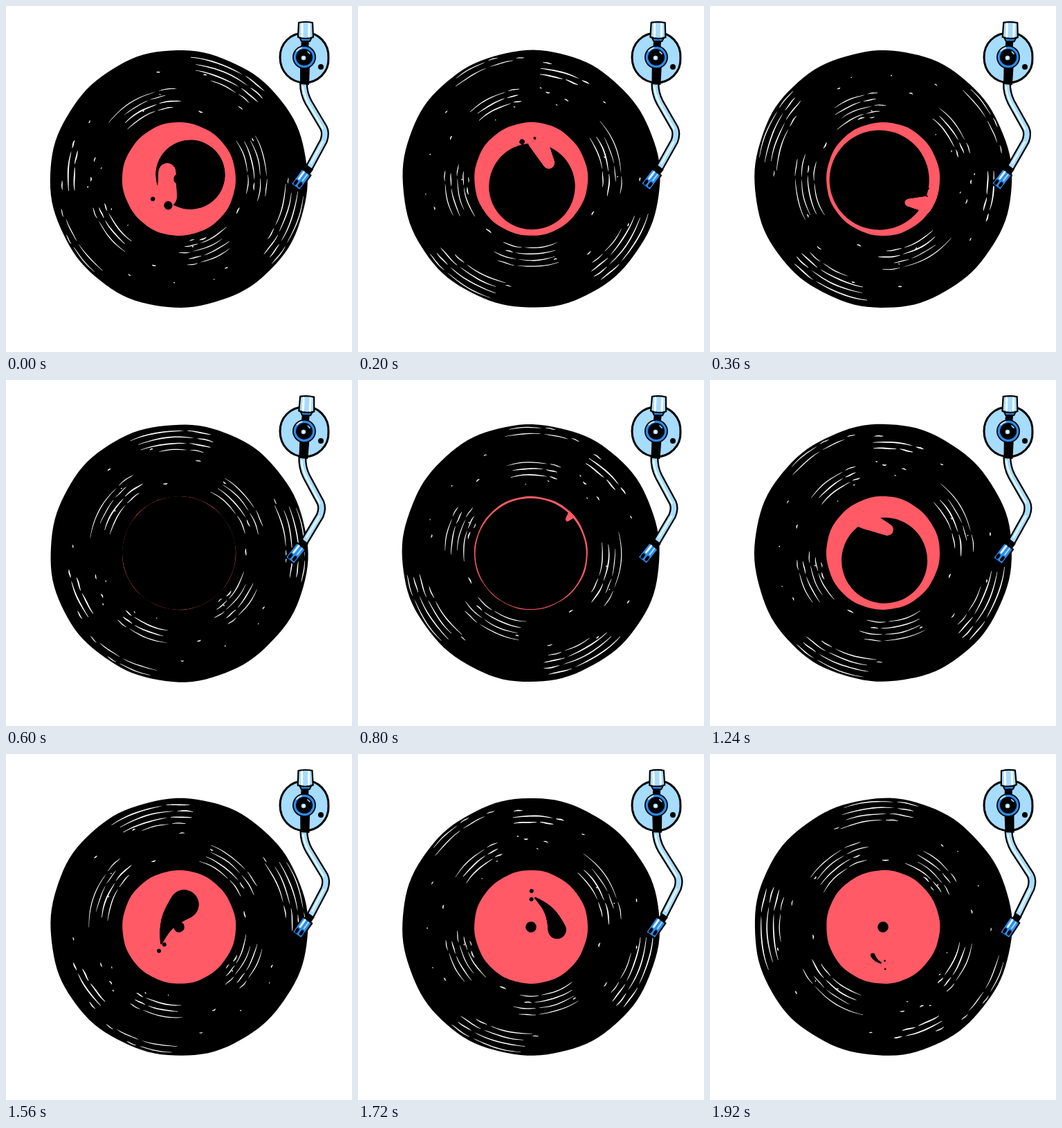
These frames come from a looping animation (500x500 px, 1960 ms). An HTML page with a canvas:

```html
<!DOCTYPE html>
<html lang="en">
<head>
<meta charset="utf-8">
<title>Turntable</title>
<style>
  html, body { margin: 0; width: 100%; height: 100%; overflow: hidden; background: #fff; }
  canvas { display: block; width: 500px; height: 500px; }
</style>
</head>
<body>
<canvas id="stage" width="500" height="500"></canvas>
<script>
const ctx = document.getElementById('stage').getContext('2d');
const STEP = 40, STEPS = 49, C = 250, LABEL = 82, FULL = 15, RAD = Math.PI / 180;
const INK = '#000', PINK = '#ff5a66', SKY = '#a6dcfd', BLUE = '#2a8cf0', PALE = '#e8f7ff';

// Angles in degrees; side and hook are places of the pool and its notch on the record
const keys = [
  { at: 0, turn: 297, arm: 0, size: 50, side: 42, hook: -85 },
  { at: 9, turn: 479, arm: 1.5, size: 72, side: 46, hook: -76 },
  { at: FULL, turn: 628, arm: 2.5, size: 82.1, side: 46, hook: -95 },
  { at: 24, turn: 910, arm: 2.1, size: 78.5, side: 46, hook: -117 },
  { at: 31, turn: 1108, arm: .8, size: 62, side: 51, hook: -107 },
  { at: 39, turn: 1338, arm: -.6, size: 21, side: 25, hook: -122 },
  { at: 48, turn: 1621, arm: -2.3, size: 3, side: -71, hook: -88 }
];

function poseAt(n) {
  let i = 0;
  while (i < keys.length - 2 && n >= keys[i + 1].at) i++;
  const a = keys[i], b = keys[i + 1], u = (n - a.at) / (b.at - a.at), pose = {};
  for (const name in a) pose[name] = a[name] + (b[name] - a[name]) * u;
  return pose;
}

const polar = (deg, r) => [r * Math.cos(deg * RAD), r * Math.sin(deg * RAD)];

let seed = 7;
const rand = () => (seed = (seed * 16807) % 2147483647) / 2147483647;

// Groove bundles: middle angle, radius, span, count
const bundles = [
  [190, 163, 42, 4], [275, 168, 36, 4], [244, 113, 50, 4], [322, 111, 42, 4],
  [38, 122, 36, 3], [139, 117, 50, 4], [77, 156, 28, 2], [40, 177, 34, 2]
];
const REST = 910;
const strokes = [];
for (const [mid, radius, span, count] of bundles) {
  for (let i = 0; i < count; i++) {
    const r = radius + (i - (count - 1) / 2) * 9, len = span * (.6 + rand() * .4);
    const a = mid - len / 2 + (rand() - .5) * 8, cut = a + len * (.6 + rand() * .25);
    const w = .9 + rand() * .8;
    strokes.push([r, a, cut - 1, w], [r + .4, cut + .5, a + len, w]);
  }
}
for (let i = 0; i < 26; i++) {
  const r = 90 + rand() * 88, a = rand() * 360;
  strokes.push([r, a, a + .7 + rand() * rand() * 7, 1 + rand() * .5]);
}

// Slim arc that thins out at both ends
function groove([r, a, b, w]) {
  const n = 12;
  ctx.beginPath();
  for (let i = 0; i <= 2 * n; i++) {
    const u = (i <= n ? i : 2 * n - i) / n;
    const half = w * (.2 + .4 * Math.sin(u * Math.PI)) * (i <= n ? 1 : -1);
    ctx.lineTo(...polar(a + (b - a) * u, r + half + .3 * Math.sin(u * 6 + r)));
  }
  ctx.fill();
}

function roughDisc(r, wobble, color) {
  ctx.fillStyle = color;
  ctx.beginPath();
  for (let d = 0; d < 360; d += 3) {
    const t = d * RAD;
    ctx.lineTo(...polar(d, r + wobble * (Math.sin(5 * t + 1) * .5 + Math.sin(13 * t) * .4)));
  }
  ctx.fill();
}

function dot(x, y, r, color) {
  ctx.fillStyle = color;
  ctx.beginPath();
  ctx.arc(x, y, r, 0, 7);
  ctx.fill();
}

// Tapering stroke from one point to another, bent sideways
function taper([x, y], [x2, y2], r, r2, bend, color) {
  const dx = x2 - x, dy = y2 - y;
  for (let u = 0; u <= 1; u += 1 / 48) {
    const k = bend * Math.sin(u * Math.PI);
    dot(x + dx * u - dy * k, y + dy * u + dx * k, r + (r2 - r) * u, color);
  }
}

function drawPool(n, { size, side, hook }) {
  const gap = Math.max(0, LABEL - size), twist = gap * 3.8;
  const reach = Math.max(0, 62 - size) * .88;

  const lobe = polar(side, gap * .55);
  dot(...lobe, size, INK);
  if (reach) taper(lobe, polar(hook, reach), size, 1, .1, INK);

  // Notch that curls in as the pool shrinks, then backs out
  const tip = polar(hook, 88 - 12 * Math.sqrt(gap) + Math.max(0, gap - 36) * 6);
  const out = polar(hook - twist, 38);
  taper(tip, [tip[0] + out[0], tip[1] + out[1]], 2 + gap * .32, 14, 0, PINK);

  for (const i of [0, 1]) {
    if (n < FULL) dot(...polar(hook - twist * (.57 + i * .25), 78 - gap * (.95 + i * .2)), gap * (.1 + i * .09), INK);
    else if (size < 45) dot(...polar(hook - 6, reach - 3 + i * 12), Math.min(3, .5 + size * .3), INK);
  }
}

function drawRecord(n, pose) {
  ctx.save();
  ctx.translate(C, C);
  ctx.save();
  ctx.rotate((pose.turn - REST) * RAD);
  roughDisc(186, 1.1, INK);
  ctx.fillStyle = '#fff';
  strokes.forEach(groove);
  roughDisc(LABEL, .5, PINK);
  ctx.restore();

  ctx.beginPath();
  ctx.arc(0, 0, LABEL, 0, 7);
  ctx.clip();
  ctx.rotate(pose.turn * RAD);
  drawPool(n, pose);
  dot(0, 0, 7.8, INK);
  ctx.restore();
}

function shape(d, fill, line, w) {
  const p = new Path2D(d);
  if (fill) { ctx.fillStyle = fill; ctx.fill(p); }
  if (line) { ctx.strokeStyle = line; ctx.lineWidth = w; ctx.stroke(p); }
}

function drawHead() {
  ctx.save();
  ctx.translate(434, 240);
  ctx.rotate(36 * RAD);
  shape('M-5 -9 H6 V2 H-5Z', INK);
  shape('M-8 0 H8 V27 H-8Z', BLUE, INK, 2.2);
  shape('M-3 2 V14', null, PALE, 3);
  shape('M3 2 V13', null, SKY, 2);
  shape('M-3.5 19 V23 M3.5 18 V22', null, INK, 4.4);
  ctx.restore();
}

function drawArm(angle) {
  ctx.lineJoin = ctx.lineCap = 'round';
  shape('M431 39 C451 37 467 54 466 75 C467 96 450 111 431 111 C411 110 396 95 396 74 C396 54 411 39 431 39Z', SKY, INK, 3);
  dot(455, 88, 4, INK);

  ctx.save();
  ctx.translate(431, 74);
  ctx.rotate(angle * RAD);
  ctx.translate(-431, -74);

  const tube = 'M430 112 Q430 126 437 139 L459 176 Q463 184 459 195 L439 232';
  shape(tube, null, INK, 12);
  shape(tube, null, SKY, 7.4);
  shape('M429 117 Q430 127 436 139 L458 177 M458 196 L441 227', null, PALE, 2.4);

  shape('M427 49 L438 49 L437 62 L426 62Z', INK);
  shape('M425 86 L439 86 L438 114 L425 113Z', INK);
  shape('M424 45 L442 45 L439 51 L427 51Z', BLUE, INK, 2);
  shape('M423 24 Q433 22 443 24 L444 45 Q433 49 422 45Z', SKY, INK, 2.2);
  shape('M428 26 L428 44 M438 26 L438 44', null, '#fff', 3);

  dot(431, 74, 17, INK);
  dot(431, 74, 15.2, BLUE);
  dot(431, 74, 12, INK);
  shape('M420 65 A14 14 0 0 1 427 60.5', null, PALE, 1.6);
  shape('M436 66 L439 69', null, SKY, 1.6);
  dot(430, 75, 3.3, SKY);
  dot(430, 75, 1.7, '#fff');
  drawHead();
  ctx.restore();
}

function draw(n) {
  const pose = poseAt(n);
  ctx.fillStyle = '#fff';
  ctx.fillRect(0, 0, 500, 500);
  drawRecord(n, pose);
  drawArm(pose.arm);
}

const begin = performance.now();
function tick() {
  draw(Math.floor((performance.now() - begin) / STEP) % STEPS);
  requestAnimationFrame(tick);
}
tick();
</script>
</body>
</html>
```
